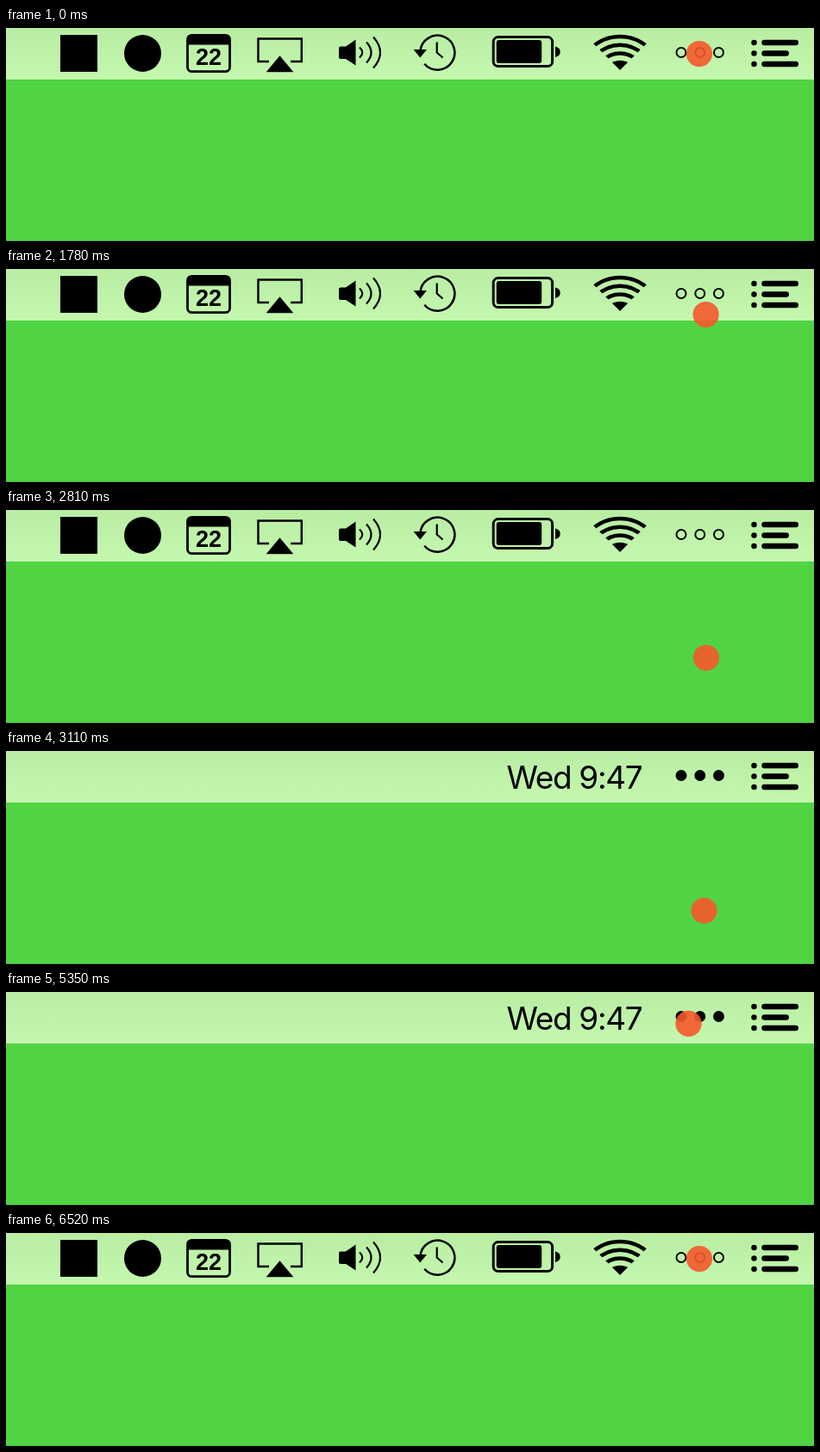
Animation, 937 px wide and 248 px high, one loop 6670 ms. Source, as an HTML page:

```html
<!DOCTYPE html>
<html lang="en">
<head>
<meta charset="utf-8">
<title>Menu bar</title>
<style>
  html, body { margin: 0; width: 100%; height: 100%; overflow: hidden; background: #50d443; }
  svg { display: block; width: 100vw; height: 100vh; }
  text { font-family: Inter, Roboto, "Liberation Sans", sans-serif; }
  .day { font: bold 27px "Liberation Sans", sans-serif; }
  .line { fill: none; stroke: #000; }
</style>
</head>
<body>
<svg viewBox="0 0 937 248">
  <defs>
    <linearGradient id="shade" x2="0" y2="1">
      <stop offset="0" stop-color="#b8eda3"/>
      <stop offset="1" stop-color="#c4f8af"/>
    </linearGradient>
    <clipPath id="fan"><path d="M712 49L674 11V0H750V11Z"/></clipPath>
  </defs>
  <rect width="937" height="248" fill="#50d443"/>
  <rect y="247" width="937" height="1" fill="#4bc93f"/>
  <rect width="937" height="60" fill="url(#shade)"/>

  <g id="icons">
    <rect x="63" y="8" width="43" height="43"/>
    <circle cx="158.500" cy="29.500" r="21.500"/>

    <rect class="line" x="210.500" y="8.300" width="49" height="42.400" rx="5" stroke-width="2.800"/>
    <path d="M210 19.500V12Q210 8 214 8H256Q260 8 260 12V19.500Z"/>
    <text class="day" x="235" y="42.600" text-anchor="middle">22</text>

    <path class="line" d="M305 39H292.500V12.500H342.800V39H330" stroke-width="2.500"/>
    <path d="M317.500 32.200L333.300 51.200H301.700Z"/>

    <path d="M388 21.500H394L405.500 13.500V43.500L394 36H388Q386 36 386 34V23.500Q386 21.500 388 21.500Z"/>
    <path class="line" d="M410 22.500Q416.500 28.500 410 34.500M418 16.500Q429 28.500 418 40.500M426 10.500Q442 28.500 426 46.500" stroke-width="2.200"/>

    <path class="line" d="M480.400 27A20 20 0 1 1 485.200 41.800" stroke-width="2.500"/>
    <path d="M472.500 25H488L480.300 34.500Z"/>
    <path class="line" d="M499.700 16.500V28.500L506.500 34.500" stroke-width="2.200"/>

    <rect class="line" x="565.200" y="10.600" width="68.400" height="34" rx="5.500" stroke-width="3"/>
    <rect x="568.700" y="13.900" width="52.500" height="27.200" rx="3"/>
    <path d="M637 21.500Q642.700 23 642.700 27.700T637 34Z"/>

    <g clip-path="url(#fan)">
      <g class="line" stroke-width="4.500">
        <circle cx="712" cy="58" r="48"/>
        <circle cx="712" cy="58" r="38.200"/>
        <circle cx="712" cy="58" r="28.500"/>
      </g>
      <circle cx="712" cy="58" r="20.300"/>
    </g>
  </g>

  <text id="clock" x="580.500" y="43.500" font-size="37" letter-spacing="-1.350">Wed 9:47</text>
  <g id="dots" stroke="#000" stroke-width="2">
    <circle cx="783" cy="28.500" r="5.500"/>
    <circle cx="804.800" cy="28.500" r="5.500"/>
    <circle cx="826.500" cy="28.500" r="5.500"/>
  </g>
  <g stroke="#000" stroke-width="6.500" stroke-linecap="round">
    <path d="M867.500 17h0M867.500 29.500h0M867.500 42h0"/>
    <path d="M879.500 17H915.700M879.500 29.500H904.700M879.500 42H915.700"/>
  </g>
  <circle id="pointer" r="15.100" fill="#f5582b" fill-opacity=".9"/>
</svg>
<script>
  const LOOP = 6670, TICKS = 45;
  const HIDE = 21, SHOW = 40;
  const get = id => document.getElementById(id);
  const icons = get('icons'), clock = get('clock'), dots = get('dots'), pointer = get('pointer');

  // Start and end in ticks, end points, and sideways bow of the path.
  const moves = [
    { a: 10.03, b: 17.5, from: [804, 30], to: [812, 172], bow: [13, 0] },
    { a: 19.6, b: 27, from: [812, 172], to: [783, 333], bow: [0, 0] },
    { a: 29.58, b: 37.35, from: [632, 294.7], to: [804, 30], bow: [0, -54.3] }
  ];

  function place(tick) {
    const m = moves.filter(v => tick >= v.a).pop() || moves[0];
    const u = Math.min(1, Math.max(0, (tick - m.a) / (m.b - m.a)));
    const p = (1 - Math.cos(Math.PI * u)) / 2;
    return m.from.map((v, i) => v + (m.to[i] - v) * p + m.bow[i] * Math.sin(Math.PI * p));
  }

  function show(el, on) {
    el.setAttribute('visibility', on ? 'visible' : 'hidden');
  }

  function draw(ms) {
    const tick = Math.floor(((ms + 8) % LOOP) / LOOP * TICKS);
    const full = tick < HIDE || tick >= SHOW;
    show(icons, full);
    show(clock, !full);
    dots.setAttribute('fill', full ? 'none' : '#000');
    const [x, y] = place(tick);
    pointer.setAttribute('cx', x);
    pointer.setAttribute('cy', y);
  }

  const start = performance.now();
  function frame() {
    draw(performance.now() - start);
    requestAnimationFrame(frame);
  }
  frame();
</script>
</body>
</html>
```
